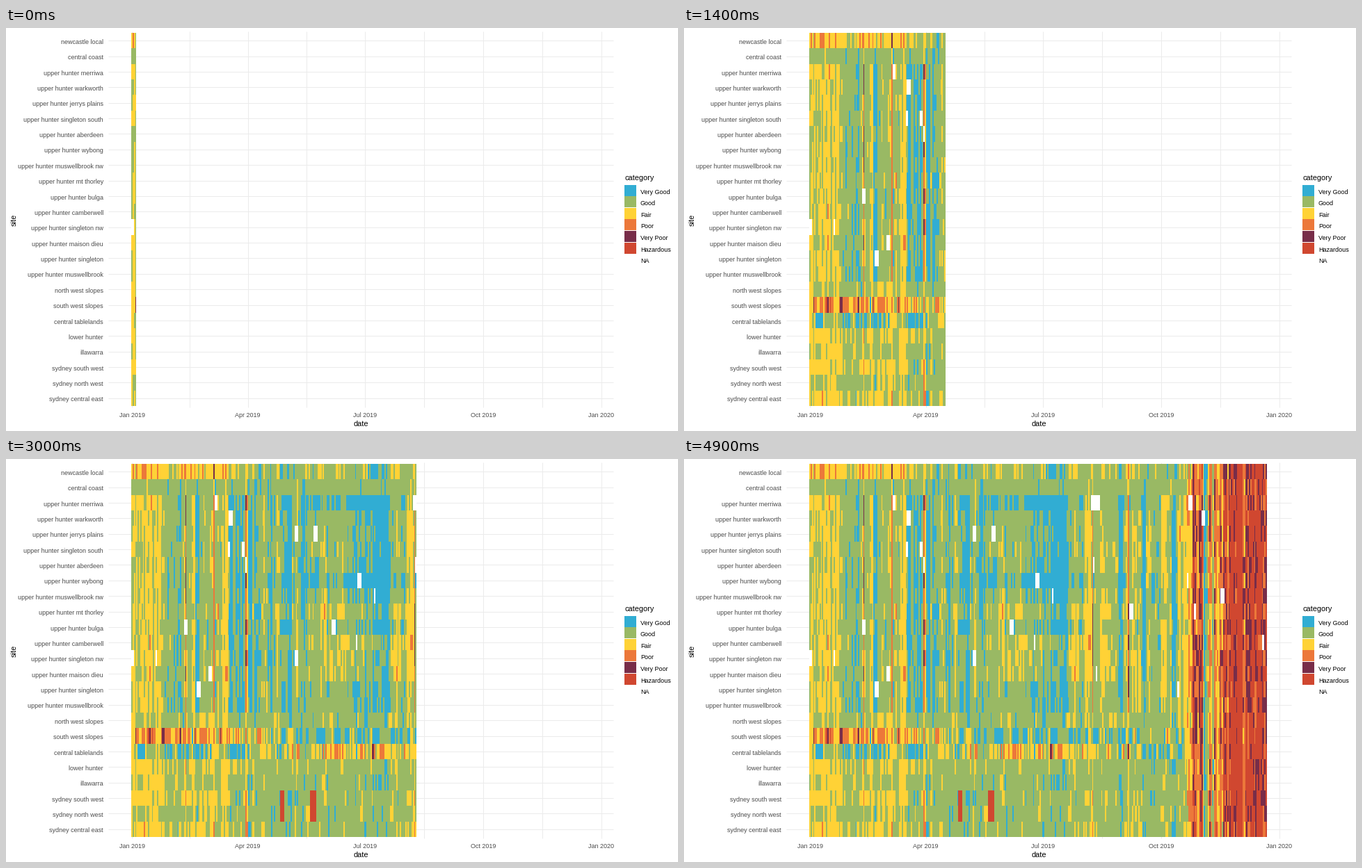
Animation of 966x580 px, one loop 10 s. Source, as a matplotlib script:

```python
import numpy as np
import matplotlib.pyplot as plt
from matplotlib.animation import FuncAnimation
from matplotlib.colors import to_rgb
from matplotlib.patches import Rectangle

W, H, DPI = 966, 580, 100
DAYS, X0, DAY_W = 356, 180.4, 1.848
TOP, ROW_H = 7, 22.375
FIRE_DAY = 294
GRID, GREY = "#ebebeb", "#4d4d4d"

SITES = ["newcastle local", "central coast"] + [
    "upper hunter " + place for place in (
        "merriwa", "warkworth", "jerrys plains", "singleton south",
        "aberdeen", "wybong", "muswellbrook nw", "mt thorley", "bulga",
        "camberwell", "singleton nw", "maison dieu", "singleton",
        "muswellbrook")
] + ["north west slopes", "south west slopes", "central tablelands",
     "lower hunter", "illawarra", "sydney south west", "sydney north west",
     "sydney central east"]
LEVELS = [("Very Good", "#31add3"), ("Good", "#99b964"), ("Fair", "#ffd236"),
          ("Poor", "#ec783a"), ("Very Poor", "#782d49"),
          ("Hazardous", "#d04730"), ("NA", "#ffffff")]
HAZARDOUS, NA = 5, 6
LIMITS = [.5, 1.5, 2.5, 3.5, 4]

# Regional mean through the year: (day, level).
SEASON = [(0, 1.4), (20, 1.7), (35, 1), (65, 1.1), (74, 1.4), (76, .1),
          (82, .2), (84, 1), (120, .9), (165, .9), (180, .3), (198, .2),
          (202, 1), (225, 1.4), (258, 1.1), (290, 1.4), (296, 3), (305, 3.5),
          (307, .3), (308, .3), (310, 2.8), (332, 3.8), (355, 3.8)]
DUST_DAYS = [42, 64, 89, 220, 248]
CLEAN_DAYS = [51, 92, 123, 242, 260, 283]

# How closely a site follows the region, summer and winter shift, own noise.
DEFAULT = (1, 0, 0, .22)
TRAITS = {
    "newcastle": (.6, .9, .3, .4),
    "central coast": (.4, -.1, 0, .2),
    "merriwa": (1, 0, -.6, .22),
    "wybong": (1, 0, -.6, .22),
    "mt thorley": (1, 0, .5, .3),
    "camberwell": (1, 0, .6, .3),
    "singleton nw": (1, 0, .5, .3),
    "maison dieu": (1, 0, .4, .3),
    "north west": (.5, .2, .2, .3),
    "south west slopes": (.3, 1.4, -.2, .7),
    "tablelands": (.4, -.4, 1.4, .8),
    "lower hunter": (.4, .4, .1, .25),
    "illawarra": (.4, .3, 0, .25),
    "sydney": (.5, .4, .1, .35),
}


def red_noise(rng, keep):
    """Unit-variance noise that remembers part of the previous day."""
    out = rng.normal(size=DAYS)
    for d in range(1, DAYS):
        out[d] = keep * out[d - 1] + (1 - keep ** 2) ** .5 * out[d]
    return out


def traits(site):
    return next((v for k, v in TRAITS.items() if k in site), DEFAULT)


def make_levels():
    rng = np.random.default_rng(19)
    day = np.arange(DAYS)
    late = day >= FIRE_DAY
    summer = np.clip((110 - day) / 40, 0, 1)
    winter = np.exp(-((day - 180) / 60) ** 2)

    region = np.interp(day, *np.array(SEASON).T)
    region += red_noise(rng, .5) * np.where(late, .75, .38)
    region[DUST_DAYS] = 3.3
    for d in CLEAN_DAYS:
        region[d - 1:d + 2] = .2

    rows = []
    for site in SITES:
        follow, warm, cold, own = traits(site)
        follow = np.where(late, 1, follow)
        level = 1 + follow * (region - 1) + warm * summer + cold * winter
        level += red_noise(rng, .4) * np.where(late, .45, own)
        rows.append(np.digitize(level, LIMITS))
    out = np.array(rows)

    # Smoke over western Sydney in May.
    for first, length in ((116, 3), (139, 5)):
        out[21:23, first:first + length] = HAZARDOUS
    # Missing readings.
    for r in range(2, 15):
        for first in rng.integers(10, DAYS, 2):
            out[r, first:first + rng.integers(1, 4)] = NA
    out[2, 219:226] = NA
    out[12, :2] = NA
    return out


def days_shown(frame):
    return min(DAYS, 4 + round(80 * frame / 11)) if frame < 49 else DAYS


fig = plt.figure(figsize=(W / DPI, H / DPI), dpi=DPI, facecolor="white")
ax = fig.add_axes([0, 0, 1, 1])
ax.axis("off")


def label(x, y, text, px=9, color=GREY, ha="left", **kw):
    ax.text(x, y, text, fontsize=px * 72 / DPI, family="Liberation Sans",
            color=color, ha=ha, va="baseline", **kw)


def line(x0, y0, x1, y1):
    ax.plot([x0, x1], [y0, y1], color=GRID, lw=72 / DPI, zorder=1,
            solid_capstyle="butt")


def date_x(day):
    return X0 + .9 + day * DAY_W


TICKS = [(0, "Jan 2019"), (90, "Apr 2019"), (181, "Jul 2019"),
         (273, "Oct 2019"), (365, "Jan 2020")]
for i, (day, text) in enumerate(TICKS):
    line(date_x(day), 5, date_x(day), 546)
    label(date_x(day), 560, text, ha="center")
    if i:
        mid = date_x((day + TICKS[i - 1][0]) / 2)
        line(mid, 5, mid, 546)
for i, site in enumerate(SITES):
    y = TOP + (i + .5) * ROW_H
    line(147, y, 873, y)
    label(140, round(y + 4.6), site, ha="right")
label(510, 573, "date", 11, "black", "center")
label(15, 276, "site", 11, "black", "center", rotation=90,
      rotation_mode="anchor")

label(890, 219, "category", 11, "black")
for i, (name, color) in enumerate(LEVELS):
    y = round(225.6 + 16.6 * i)
    ax.add_patch(Rectangle((889, y), 17, 16, fc=color, lw=0,
                           antialiased=False))
    label(912, y + 13, name, color="black")

palette = np.array([to_rgb(color) for _, color in LEVELS])
cells = np.ones((len(SITES), DAYS, 4))
cells[..., :3] = palette[make_levels()]
tiles = ax.imshow(cells, extent=(X0, X0 + DAYS * DAY_W,
                                 TOP + len(SITES) * ROW_H, TOP),
                  interpolation="nearest", aspect="auto", zorder=3)
ax.set_xlim(0, W)
ax.set_ylim(H, 0)


def draw(frame):
    view = cells.copy()
    view[:, days_shown(frame):, 3] = 0
    tiles.set_data(view)
    return [tiles]


anim = FuncAnimation(fig, draw, frames=100, interval=100,
                     init_func=lambda: draw(0), repeat=True, repeat_delay=0)
plt.show()
```
